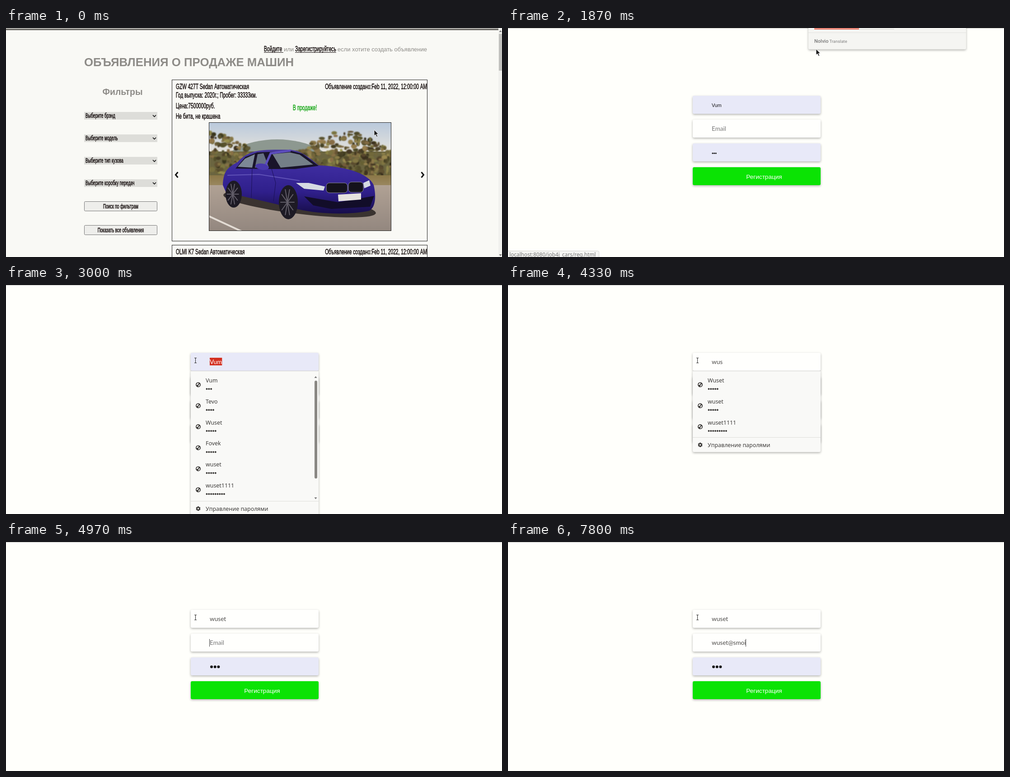
An HTML page with a canvas that plays this animation: 1098 px wide and 510 px high, repeating every 8000 ms.

```html
<!DOCTYPE html>
<html lang="ru">
<head>
<meta charset="utf-8">
<title>Объявления</title>
<style>
html, body { margin: 0; width: 100%; height: 100%; overflow: hidden; background: #fffffb; }
canvas { display: block; }
</style>
</head>
<body>
<canvas id="stage" width="1098" height="510"></canvas>
<script>
const LOOP = 8000;
const ARIAL = '"Liberation Sans", Arial, sans-serif';
const LATO = 'Lato, sans-serif';
const MENU = '"Noto Sans", sans-serif';
const stage = document.getElementById('stage').getContext('2d');
let ctx = stage;

// ---------- helpers ----------
const ramp = (t, from, to) => Math.min(1, Math.max(0, (t - from) / (to - from)));
const smooth = p => p * p * (3 - 2 * p);
const mix = (a, b, p) => a + (b - a) * p;
const countBefore = (times, t) => times.filter(time => time <= t).length;

function rect(x, y, w, h, color) {
  ctx.fillStyle = color;
  ctx.fillRect(x, y, w, h);
}

function trace(points) {
  ctx.beginPath();
  for (let i = 0; i < points.length; i += 2) ctx.lineTo(points[i], points[i + 1]);
}

function poly(color, ...points) {
  trace(points);
  ctx.closePath();
  ctx.fillStyle = color;
  ctx.fill();
}

function line(color, width, ...points) {
  trace(points);
  ctx.strokeStyle = color;
  ctx.lineWidth = width;
  ctx.stroke();
}

function oval(x, y, rx, ry, color, angle = 0) {
  ctx.beginPath();
  ctx.ellipse(x, y, rx, ry, angle, 0, 2 * Math.PI);
  ctx.fillStyle = color;
  ctx.fill();
}

function box(x, y, w, h, radius, fill, border) {
  ctx.beginPath();
  ctx.roundRect(x, y, w, h, radius);
  ctx.fillStyle = fill;
  ctx.fill();
  if (!border) return;
  ctx.strokeStyle = border;
  ctx.lineWidth = 1;
  ctx.stroke();
}

function triangle(x, y, dir) {
  poly('#777', x - 3, y - 2 * dir, x, y + 2 * dir, x + 3, y - 2 * dir);
}

function raised(draw) {
  ctx.save();
  ctx.shadowColor = 'rgba(0,0,0,.3)';
  ctx.shadowBlur = 5;
  ctx.shadowOffsetY = 2;
  draw();
  ctx.restore();
}

function faded(alpha, draw) {
  if (alpha <= 0) return;
  ctx.save();
  ctx.globalAlpha = alpha;
  draw();
  ctx.restore();
}

function text(str, x, y, font, color, align = 'left') {
  ctx.font = font;
  ctx.fillStyle = color;
  ctx.textAlign = align;
  ctx.fillText(str, x, y);
  return ctx.measureText(str).width;
}

// One condensed face for the listing page
const CONDENSE = 0.6;
function narrow(str, x, y, { size = 17, color = '#100808', align = 'left' } = {}) {
  ctx.save();
  ctx.translate(x, y);
  ctx.scale(CONDENSE, 1);
  const width = text(str, 0, 0, `${size}px ${ARIAL}`, color, align) * CONDENSE;
  ctx.strokeStyle = color;
  ctx.lineWidth = 0.5;
  ctx.strokeText(str, 0, 0);
  ctx.restore();
  return width;
}

function link(str, x, y) {
  rect(x, y + 2, narrow(str, x, y), 1, '#100808');
}

function dots(n, x, y, step, r, color) {
  for (let i = 0; i < n; i++) oval(x + i * step, y, r, r, color);
}

// ---------- photo ----------
function gradient(top, bottom, ...colors) {
  const fill = ctx.createLinearGradient(0, top, 0, bottom);
  colors.forEach((color, i) => fill.addColorStop(i / (colors.length - 1), color));
  return fill;
}

function scenery() {
  rect(449, 210, 404, 100, gradient(210, 290, '#b9c9dc', '#efe8dc'));
  oval(600, 320, 130, 72, '#8d9890');
  rect(449, 275, 404, 80, '#6b6540');

  // Tree crowns follow a wave, tall at both sides and low behind the car
  let seed = 7;
  const random = () => (seed = seed * 16807 % 2147483647) / 2147483647;
  ctx.filter = 'blur(1px)';
  for (let i = 0; i < 600; i++) {
    const x = 449 + random() * 404;
    const crown = 258 - 28 * Math.cos((x - 750) / 48);
    oval(x, mix(crown, 330, random()), 2 + random() * 5, 2 + random() * 4,
      `hsl(${36 + random() * 20} 32% ${16 + random() * 30}%)`);
  }
  ctx.filter = 'none';
  rect(449, 328, 404, 26, gradient(328, 354, '#8b7747', '#9c8a63'));
  rect(449, 350, 404, 102, gradient(350, 452, '#b0a194', '#93877f'));
  line('#e3dcd4', 4, 449, 419, 522, 453);
}

function wheel(x, y, rx, ry) {
  oval(x, y, rx, ry, '#1d1a24');
  for (let a = 0; a < 2 * Math.PI; a += Math.PI / 5) {
    line('#625e69', 2, x - 2, y, x - 2 + Math.cos(a) * rx * 0.75, y + Math.sin(a) * ry * 0.8);
  }
}

function car() {
  oval(650, 392, 170, 22, '#3a3330', 0.12);
  ctx.beginPath();
  ctx.moveTo(480, 350);
  ctx.bezierCurveTo(481, 316, 494, 309, 512, 299);
  ctx.bezierCurveTo(540, 270, 560, 271, 626, 271);
  ctx.bezierCurveTo(652, 272, 668, 286, 692, 306);
  ctx.bezierCurveTo(760, 308, 806, 328, 814, 350);
  ctx.bezierCurveTo(820, 375, 818, 400, 804, 407);
  ctx.bezierCurveTo(760, 417, 690, 414, 648, 404);
  ctx.lineTo(487, 366);
  ctx.fillStyle = gradient(271, 412, '#4a3b9e', '#3b2a9c', '#2f1f8b', '#180e4c');
  ctx.fill();

  poly('#19142a', 508, 313, 530, 287, 556, 277, 632, 274, 656, 280, 692, 307, 640, 314, 586, 314);
  poly('#7d8896', 513, 309, 529, 291, 551, 281, 545, 311);
  poly('#667083', 551, 311, 557, 281, 570, 279, 582, 311);
  poly('#747f88', 590, 281, 628, 277, 650, 282, 680, 304, 608, 311);
  line('#5c4dbd', 5, 572, 311, 586, 279, 630, 273);
  oval(567, 309, 15, 7, '#4838ab', 0.15);
  line('#6153b8', 2, 490, 328, 560, 326, 650, 340);
  line('#1a1056', 1, 545, 312, 543, 378);
  line('#1a1056', 1, 588, 314, 597, 345, 592, 386);
  wheel(504, 370, 18, 30);
  wheel(625, 388, 21, 38);

  poly('#d5dae2', 642, 345, 670, 345, 706, 353, 703, 362, 660, 358);
  poly('#d5dae2', 791, 345, 804, 339, 807, 351, 793, 357);
  poly('#120d29', 660, 375, 735, 388, 815, 374, 806, 398, 720, 403, 680, 395);
  box(709, 345, 47, 22, 7, '#14121c', '#8d8a9c');
  box(758, 343, 33, 23, 7, '#14121c', '#8d8a9c');
  poly('#e5e2df', 735, 371, 786, 368, 786, 382, 736, 386);
}

function makePhoto() {
  const canvas = document.createElement('canvas');
  canvas.width = 404;
  canvas.height = 242;
  ctx = canvas.getContext('2d');
  ctx.translate(-449, -210);
  scenery();
  car();
  ctx = stage;
  return canvas;
}
const photo = makePhoto();

// ---------- listing page ----------
function chevron(x, y, dir) {
  line('#111', 3, x - 2.5 * dir, y - 6, x + 2.5 * dir, y, x - 2.5 * dir, y + 6);
}

function card(y, title) {
  ctx.strokeStyle = '#222';
  ctx.lineWidth = 1;
  ctx.strokeRect(367.5, y + 0.5, 565, 359);
  narrow(title, 376, y + 21);
  narrow('Объявление создано:Feb 11, 2022, 12:00:00 AM', 932, y + 21, { align: 'right' });
}

function listingPage() {
  rect(0, 0, 1098, 510, '#f9f9f5');
  rect(0, 1, 1090, 4, '#75736f');
  const gray = '#8d8b87';

  link('Войдите ', 571, 52);
  text('или', 615, 52, `13px ${ARIAL}`, gray);
  link('Зарегистрируйтесь', 640, 52);
  text('если хотите создать объявление', 932, 52, `13px ${ARIAL}`, gray, 'right');
  text('ОБЪЯВЛЕНИЯ О ПРОДАЖЕ МАШИН', 173, 85, `bold 25.8px ${ARIAL}`, gray);
  text('Фильтры', 258, 149, `bold 19.4px ${ARIAL}`, gray, 'center');

  ['брэнд', 'модель', 'тип кузова', 'коробку передач'].forEach((name, i) => {
    const y = 187 + i * 50;
    rect(173, y, 162, 17, '#ddddd9');
    narrow('Выберите ' + name, 176, y + 13, { size: 14.3 });
    line('#111', 1.7, 325, y + 7, 328.5, y + 10.5, 332, y + 7);
  });
  ['Поиск по фильтрам', 'Показать все объявления'].forEach((label, i) => {
    const y = 387 + i * 53;
    box(173.5, y - 0.5, 161, 21, 2, '#eeeeeb', '#777');
    narrow(label, 254, y + 15, { size: 14.3, align: 'center' });
  });

  card(115, 'GZW 427T Sedan Автоматическая');
  card(483, 'OLMI K7 Sedan Автоматическая');
  narrow('Год выпуска: 2020г.; Пробег: 33333км.', 376, 155);
  narrow('Цена:7500000руб.', 376, 179);
  narrow('В продаже!', 635, 183, { color: '#12a512' });
  narrow('Не бита, не крашена', 376, 202);
  ctx.drawImage(photo, 449, 210);
  ctx.strokeRect(449.5, 210.5, 403, 241);
  chevron(378, 327, -1);
  chevron(922, 327, 1);

  rect(1090, 0, 8, 510, '#f1f1ee');
  rect(1091, 13, 7, 82, '#c1c1be');
  triangle(1094.5, 7, -1);
  triangle(1094.5, 506, 1);
}

// ---------- registration page ----------
const LOGIN = 'wuset', EMAIL = 'wuset@smoi';
const LOGIN_KEYS = [3530, 3630, 3730, 4430, 4530];
const EMAIL_KEYS = [5630, 5730, 5930, 6070, 6230, 6630, 7070, 7170, 7630, 7800];
const ACCOUNTS = ['Vum', 'Tevo', 'Wuset', 'Fovek', 'wuset', 'wuset1111'];
const OPEN = 1630, FOCUS = 2850, TYPING = LOGIN_KEYS[0], TAB = 4870;
const INPUT = `13.6px ${LATO}`;
const AUTOFILL = '#e8e9f8', PLAIN = '#fffffd', INK = '#4d4b49', MENU_INK = '#3d3b39';

function caret(x, y) {
  rect(Math.round(x), y, 1, 17, '#444');
}

function loginField(t) {
  if (t < FOCUS) {
    text('Vum', 451, 176, `10.67px ${ARIAL}`, '#111');
  } else if (t < TYPING) {
    ctx.font = INPUT;
    rect(451, 162, ctx.measureText('Vum').width, 17, '#d32f20');
    text('Vum', 451, 176, INPUT, '#fff');
  } else {
    const typed = LOGIN.slice(0, countBefore(LOGIN_KEYS, t));
    const width = text(typed, 451, 176, INPUT, INK);
    if (t < 4330 || (t >= 4430 && t < TAB)) caret(450 + width, 162);
  }
}

function emailField(t) {
  const typed = EMAIL.slice(0, countBefore(EMAIL_KEYS, t));
  const width = text(typed || 'Email', 451, 229, INPUT, typed ? INK : '#777');
  if (typed) caret(450 + width, 216);
  else if (t >= TAB && t < 5370) caret(450, 216);
}

function registrationPage(t) {
  rect(0, 0, 1098, 510, '#fffffb');
  rect(0, 0, 1098, 1, '#bdbdb9');
  [t < TYPING ? AUTOFILL : PLAIN, PLAIN, AUTOFILL, '#0be304'].forEach((color, i) =>
    raised(() => box(409, 151 + i * 53, 283, 40, 3, color)));
  loginField(t);
  emailField(t);
  if (t < FOCUS) dots(3, 453, 279, 3.6, 1.6, '#111');
  else dots(3, 455, 278, 7.7, 3, '#111');
  text('Регистрация', 567, 336, `13.6px ${ARIAL}`, '#fff', 'center');

  faded(ramp(t, 2880, 2980) * (1 - ramp(t, 4770, 4960)), () => accountMenu(t));
  faded(ramp(t, 1770, 1860) * (1 - ramp(t, 2850, 2950)), translatePopup);
}

function globe(x, y) {
  oval(x, y, 5.5, 5.5, MENU_INK);
  oval(x - 1.5, y - 1.5, 1.5, 3, '#f9f9f7', 0.8);
  oval(x + 2, y + 1.5, 1.2, 3, '#f9f9f7', 0.5);
}

function gear(x, y) {
  for (let a = Math.PI / 6; a < Math.PI; a += Math.PI / 3) {
    const dx = Math.cos(a) * 5, dy = Math.sin(a) * 5;
    line(MENU_INK, 3, x - dx, y - dy, x + dx, y + dy);
  }
  oval(x, y, 4, 4, MENU_INK);
  oval(x, y, 1.7, 1.7, '#f9f9f7');
}

function accountMenu(t) {
  const all = t < TYPING;
  const names = all ? ACCOUNTS : ACCOUNTS.filter(name => name.toLowerCase().startsWith(LOGIN));
  const divider = all ? 481 : 339;
  raised(() => box(409, 192, 283, divider + 33 - 192, [0, 0, 3, 3], '#f9f9f7'));
  rect(409, 191, 283, 1, '#d5d5d3');
  names.forEach((name, i) => {
    const y = 222 + i * 46.8;
    globe(425.5, y);
    text(name, 442, y - 5, `12.4px ${MENU}`, MENU_INK);
    dots(name.length, 444.5, y + 9.5, 4.8, 2, MENU_INK);
  });
  rect(409, divider, 283, 1, '#dededb');
  gear(425.5, divider + 17);
  text('Управление паролями', 442, divider + 21.5, `12.4px ${MENU}`, MENU_INK);
  if (!all) return;
  box(683, 213, 6, 218, 3, '#8a8884');
  triangle(685.5, 205, -1);
  triangle(685.5, 475, 1);
}

function translatePopup() {
  raised(() => box(665, -10, 349, 57.5, 3, '#f5f5f2'));
  rect(678, 2, 177, 1, '#d5d5d2');
  rect(678, 1, 99, 2, '#e0452f');
  rect(665, 10, 349, 1, '#e2e2df');
  const width = text('Nolvio', 678, 33, '500 11px Roboto, sans-serif', '#777');
  text('Translate', 680 + width, 33, '9.5px Roboto, sans-serif', '#808080');
}

// ---------- status bar and pointer ----------
function statusBar() {
  box(-3.5, 496.5, 205, 20, 3, '#f5f5f2', '#d4d4d1');
  text('localhost:8080/job4j_cars/reg.html', 3, 509, `11.8px ${MENU}`, '#777');
}

const MOVES = [
  { from: 400, to: 1370, x: 682, y: 47 },
  { from: 2400, to: FOCUS, x: 419, y: 168 }
];

function pointer(t) {
  let x = 815, y = 227;
  for (const move of MOVES) {
    const p = smooth(ramp(t, move.from, move.to));
    x = mix(x, move.x, p);
    y = mix(y, move.y, p);
  }
  ctx.save();
  ctx.translate(Math.round(x), Math.round(y));
  if (t > OPEN && y > 151) {
    for (const end of [-5.5, 5.5]) line('#222', 1, -2, end, 3, end);
    line('#222', 1, 0.5, -5, 0.5, 5);
  } else {
    poly('#1c1c1c', 0, 0, 0, 13, 3, 10.3, 5.5, 15.5, 7.7, 14.5, 5.3, 9.5, 9.2, 9.2);
    ctx.strokeStyle = '#fff';
    ctx.lineWidth = 0.8;
    ctx.stroke();
  }
  ctx.restore();
}

function frame() {
  const t = performance.now() % LOOP;
  if (t < OPEN) listingPage();
  else registrationPage(t);
  faded(ramp(t, 1300, 1400) * (1 - ramp(t, 2130, 2230)), statusBar);
  pointer(t);
  requestAnimationFrame(frame);
}
frame();
</script>
</body>
</html>
```
